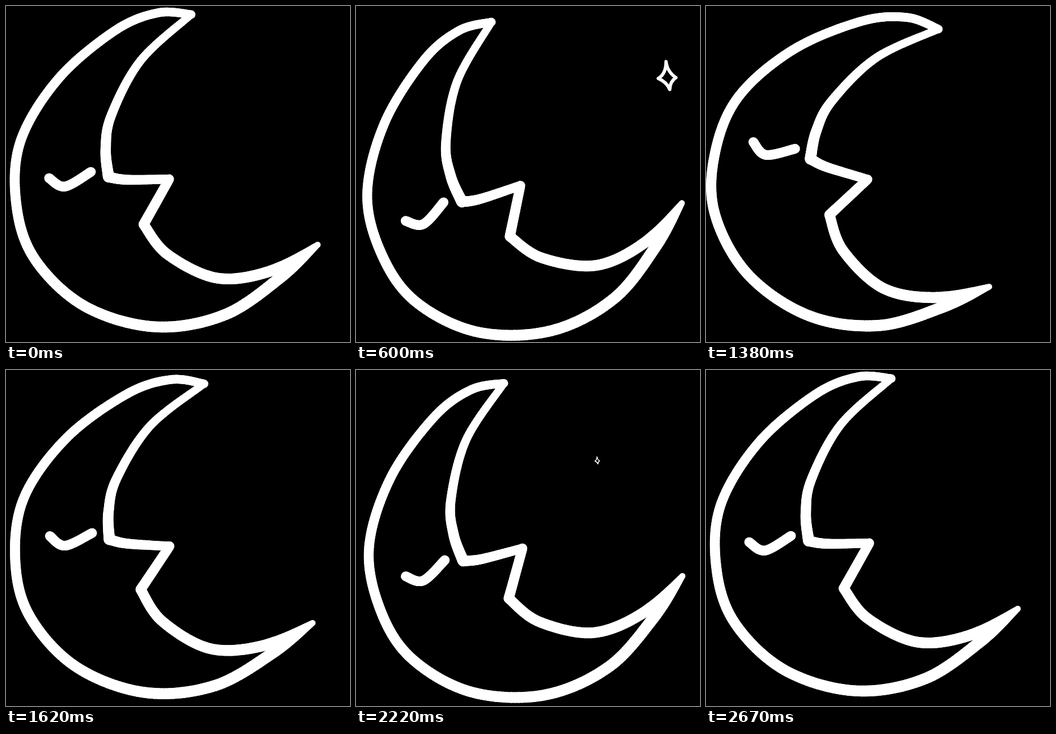
An HTML page with a canvas for the animation above (2.7 s loop, 607x594 px).

```html
<!DOCTYPE html>
<html lang="en">
<head>
<meta charset="utf-8">
<title>Rocking moon</title>
<style>
  html, body { margin: 0; width: 100%; height: 100%; overflow: hidden; background: #000; }
  canvas { display: block; }
</style>
</head>
<body>
<canvas id="stage" width="607" height="594"></canvas>
<script>
const ctx = document.getElementById('stage').getContext('2d');
const LOOP = 2700, STEP = 30;
const SWING = 18 * Math.PI / 180, PIVOT = [303, 290];
const TOP = [329, 12], TIP = [552, 419], NOSE = [290, 303], BROW = [183, 299], CHIN = [245, 383];

// Brush strokes: width at start and end, points to pass through
const strokes = [
  { width: [15, 21], pts: [TOP, [270, 9], [195, 40], [95, 125], [28, 235], [20, 345], [52, 443],
                           [140, 527], [265, 564], [390, 542], [495, 470], TIP] },
  { width: [13, 20], pts: [TOP, [240, 93], [188, 190], [178, 250], BROW] },
  { width: [19, 16], pts: [BROW, [215, 304], NOSE] },
  { width: [17, 18], pts: [NOSE, CHIN] },
  { width: [18, 20], pts: [CHIN, [287, 436], [375, 478], [470, 465], TIP] },
  { width: [17, 17], pts: [[78, 301], [106, 316], [152, 290]] }
];

const stars = [{ x: 550, y: 128, from: 148 }, { x: 426, y: 161, from: 1710 }];
const STAR_LIFE = 580, STAR_SIZE = 2.2;
const starPath = new Path2D('M-4 -41Q-1 -16 20 -2Q6 7 5 27Q-2 9 -23 0Q-4 -11 -4 -41Z');

const mix = (a, b, k) => a + (b - a) * k;
const ease = k => (1 - Math.cos(Math.PI * k)) / 2;

// Rest, left, right, left, rest
function angleAt(t) {
  const stops = [0, -SWING, SWING, -SWING, 0];
  const k = t / LOOP * 4, i = Math.floor(k);
  return mix(stops[i], stops[i + 1], ease(k - i));
}

function spline(a, b, c, d, k) {
  return b + k * (c - a + k * (2 * a - 5 * b + 4 * c - d + k * (3 * (b - c) + d - a))) / 2;
}

function pointAt(pts, pos) {
  const n = pts.length - 1, i = Math.min(Math.floor(pos), n - 1);
  const near = [i - 1, i, i + 1, i + 2].map(j => pts[Math.max(0, Math.min(j, n))]);
  return [0, 1].map(axis => spline(...near.map(p => p[axis]), pos - i));
}

function brush({ width, pts }) {
  const count = (pts.length - 1) * 20;
  let last = pts[0];
  for (let i = 1; i <= count; i++) {
    const u = i / count, p = pointAt(pts, u * (pts.length - 1));
    const taper = Math.min(1, 0.5 + Math.hypot(p[0] - TIP[0], p[1] - TIP[1]) / 160);
    ctx.lineWidth = mix(...width, u) * taper;
    ctx.beginPath();
    ctx.moveTo(...last);
    ctx.lineTo(...p);
    ctx.stroke();
    last = p;
  }
}

function drawMoon(t) {
  const turn = 2 * Math.PI * t / LOOP;
  const dx = -2 - 2.5 * Math.sin(turn);
  const dy = 3 + 5 * Math.sin(turn / 2) + 5 * Math.sin(turn) ** 2;
  ctx.save();
  ctx.translate(PIVOT[0] + dx, PIVOT[1] + dy);
  ctx.rotate(angleAt(t));
  ctx.translate(-PIVOT[0], -PIVOT[1]);
  strokes.forEach(brush);
  ctx.restore();
}

function drawStar({ x, y, from }, t) {
  const k = (t - from) / STAR_LIFE;
  if (k <= 0 || k >= 1) return;
  const size = STAR_SIZE * Math.sin(Math.PI * k) ** 2;
  ctx.save();
  ctx.translate(x, y);
  ctx.scale(size, size);
  ctx.lineWidth = 8;
  ctx.stroke(starPath);
  ctx.restore();
}

function frame() {
  // Hold each pose for one step, sampled at its middle
  const t = (Math.floor(performance.now() % LOOP / STEP) + 0.5) * STEP;
  ctx.fillStyle = '#000';
  ctx.fillRect(0, 0, 607, 594);
  ctx.strokeStyle = '#fff';
  ctx.lineCap = ctx.lineJoin = 'round';
  drawMoon(t);
  stars.forEach(star => drawStar(star, t));
  requestAnimationFrame(frame);
}
frame();
</script>
</body>
</html>
```
